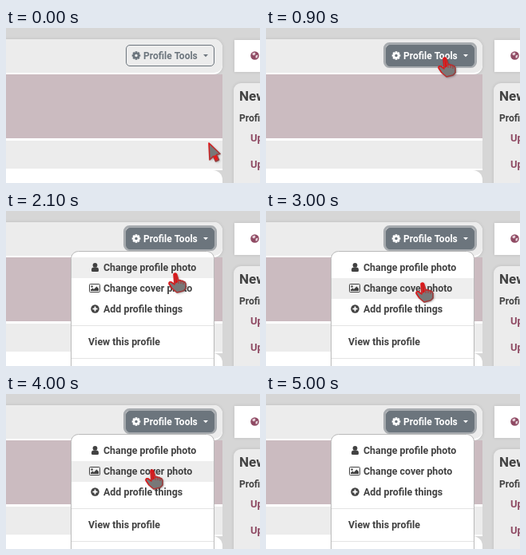
An HTML page with a canvas for the animation above (5.2 s loop, 318 px wide and 194 px high).

```html
<!DOCTYPE html>
<html lang="en">
<head>
<meta charset="utf-8">
<title>Profile tools</title>
<style>
html, body { margin: 0; width: 100%; height: 100%; overflow: hidden; background: #d6d6d6; }
canvas { display: block; width: 318px; height: 194px; }
</style>
</head>
<body>
<canvas id="stage"></canvas>
<script>
const W = 318, H = 194, LOOP = 5200;
const canvas = document.getElementById('stage');
const ctx = canvas.getContext('2d');
const ratio = window.devicePixelRatio || 1;
canvas.width = W * ratio;
canvas.height = H * ratio;

const INK = '#424242', PANEL = '#ececec', WINE = '#8f4a63', GREY = '#6c757d', DARK = '#4a1128';

// The pointer jumps between these places: time, x, y, shape.
const STEPS = [
  [0, 254, 144, 'arrow'], [200, 254, 142, 'arrow'], [400, 251, 122, 'arrow'],
  [500, 244, 88, 'arrow'], [600, 233, 52, 'arrow'], [700, 226, 37, 'hand'],
  [900, 224, 37, 'hand'], [1100, 222, 37, 'hand'], [1500, 207, 46, 'arrow'],
  [1600, 206, 50, 'arrow'], [1700, 207, 55, 'arrow'], [1800, 210, 64, 'hand'],
  [1900, 213, 74, 'hand'], [2000, 214, 79, 'hand'], [2100, 212, 78, 'hand'],
  [2200, 168, 79, 'hand'], [2300, 128, 79, 'hand'], [2600, 170, 82, 'hand'],
  [2700, 211, 88, 'hand'], [3000, 196, 90, 'hand'], [3100, 154, 96, 'hand'],
  [3300, 132, 96, 'hand'], [3400, 110, 96, 'hand'], [3600, 128, 96, 'hand'],
  [3700, 154, 96, 'hand'], [3800, 182, 96, 'hand'], [3900, 201, 96, 'hand'],
  [4000, 183, 95, 'hand'], [4100, 166, 96, 'hand'], [4200, 150, 98, 'hand'],
  [4300, 132, 98, 'hand'], [4400, 114, 97, 'hand'], [4500, 97, 95, 'hand'],
  [4600, 83, 95, 'arrow'], [4800, 76, 50, 'arrow'], [4900, 171, 3, 'arrow'],
  [5000, 0, 0, 'none']
];

function box(x, y, w, h, r, fill, stroke, line = 1) {
  ctx.beginPath();
  ctx.roundRect(x, y, w, h, r);
  if (fill) { ctx.fillStyle = fill; ctx.fill(); }
  if (stroke) { ctx.strokeStyle = stroke; ctx.lineWidth = line; ctx.stroke(); }
}

function disc(x, y, r, fill) {
  ctx.beginPath();
  ctx.arc(x, y, r, 0, Math.PI * 2);
  ctx.fillStyle = fill;
  ctx.fill();
}

function poly(points, fill) {
  ctx.beginPath();
  points.forEach(([x, y]) => ctx.lineTo(x, y));
  ctx.closePath();
  ctx.fillStyle = fill;
  ctx.fill();
}

function text(string, x, y, size, color) {
  ctx.font = `bold ${size}px Roboto, sans-serif`;
  ctx.fillStyle = color;
  ctx.fillText(string, x, y);
}

function shadowed(blur, color, draw) {
  ctx.save();
  ctx.shadowBlur = blur * ratio;
  ctx.shadowColor = color;
  draw();
  ctx.restore();
}

function drawPage() {
  ctx.fillStyle = '#d6d6d6';
  ctx.fillRect(0, 0, W, H);

  shadowed(4, 'rgba(0,0,0,.12)', () => box(-20, 14, 291, 44, [0, 11, 11, 0], '#fff'));
  box(-20, 14, 291, 42, [0, 11, 10, 0], PANEL);
  ctx.fillStyle = '#cbbbc0';
  ctx.fillRect(0, 58, 271, 80);
  ctx.fillStyle = '#fff';
  ctx.fillRect(0, 138, 271, 40);
  ctx.fillStyle = PANEL;
  ctx.fillRect(0, 141, 271, 35);
  box(-20, 178, 291, 40, [0, 12, 0, 0], '#fff');

  shadowed(4, 'rgba(0,0,0,.12)', () => {
    box(286, 15, 50, 40, 0, '#fff');
    box(285, 69, 50, 140, [9, 0, 0, 0], PANEL);
  });
  drawGlobe(311.5, 34.5);
  text('New', 292, 91, 17, INK);
  text('Profile', 292, 116.5, 12, INK);
  text('Updates', 306, 142, 13, WINE);
  text('Updates', 306, 175, 13, WINE);
}

function drawGlobe(x, y) {
  disc(x, y, 5.3, WINE);
  poly([[x - 3, y - 3], [x, y - 4], [x + 1, y - 2], [x - 1, y], [x - 3, y - 1]], '#e5d3da');
  poly([[x + 1, y], [x + 4, y - 1], [x + 3, y + 3], [x + 1, y + 3]], '#e5d3da');
}

function drawGear(x, y, color, hole) {
  ctx.save();
  ctx.translate(x, y);
  ctx.fillStyle = color;
  for (let i = 0; i < 4; i++) {
    ctx.fillRect(-1.3, -5.3, 2.6, 10.6);
    ctx.rotate(Math.PI / 4);
  }
  ctx.restore();
  disc(x, y, 4, color);
  disc(x, y, 1.7, hole);
}

function drawButton(state) {
  const idle = state === 'idle';
  const fill = { idle: PANEL, hover: DARK, open: GREY }[state];
  const ink = idle ? GREY : '#fff';
  if (state === 'open') box(148.5, 19.5, 114, 29, 6, null, '#a7abaf', 3);
  box(150.5, 21.5, 110, 26, 4.5, fill, idle ? GREY : fill);
  drawGear(163, 34.5, ink, fill);
  text('Profile Tools', 172, 39, 12, ink);
  poly([[247, 33], [253, 33], [250, 36.2]], ink);
}

function drawPerson() {
  disc(111.5, 67.8, 2.9, INK);
  box(107, 70.5, 9, 5.5, [3, 3, 1.5, 1.5], INK);
}

function drawPicture() {
  box(104.5, 91.5, 13, 10, 1, null, INK);
  disc(107.6, 94.5, 1.2, INK);
  poly([[106, 100], [106, 98.6], [108.5, 96.5], [110, 98], [113.4, 94.6], [116, 97], [116, 100]], INK);
}

function drawPlus() {
  disc(111.5, 122.5, 5.2, INK);
  ctx.fillStyle = '#fff';
  ctx.fillRect(108.5, 121.6, 6, 1.8);
  ctx.fillRect(110.6, 119.5, 1.8, 6);
}

function drawMenu(row) {
  box(81.5, 50.5, 179, 180, 9, '#fff', '#b9b9b9');
  if (row >= 0) {
    ctx.fillStyle = '#eeeeee';
    ctx.fillRect(82, 58 + row * 26, 178, 26);
  }
  drawPerson();
  drawPicture();
  drawPlus();
  ['Change profile photo', 'Change cover photo', 'Add profile things']
    .forEach((label, i) => text(label, 122, 75 + i * 26, 12.4, INK));
  text('View this profile', 103, 168, 12.4, INK);
  ctx.fillStyle = '#e4e4e4';
  ctx.fillRect(82, 143, 178, 1);
  ctx.fillRect(82, 184, 178, 1);
}

const ARROW = new Path2D('M0 0L14 13.5L9.5 14.5L12.5 21L8.5 23L5.5 16.5L1 21Z');
const HAND = new Path2D('M-2 1Q0-1 1.5 1L4 9Q6 8 7 9.5Q9 9 10 10.5Q12 10 13 13L13 19L10 22L2 24L-4 19L-8 13Q-8 10-5 11L-1 14Z');

// The outline fades from bright red at the upper left to a dull red.
function outlineColor() {
  const fade = ctx.createLinearGradient(-4, 8, 12, 18);
  fade.addColorStop(0, '#e01215');
  fade.addColorStop(0.45, '#c42a2a');
  fade.addColorStop(1, '#963c3c');
  return fade;
}

function drawPointer(x, y, shape) {
  if (shape === 'none') return;
  const hand = shape === 'hand';
  const path = hand ? HAND : ARROW;
  ctx.save();
  ctx.translate(x, y);
  ctx.lineJoin = 'round';
  shadowed(3, 'rgba(0,0,0,.5)', () => {
    ctx.shadowOffsetX = ctx.shadowOffsetY = ratio;
    ctx.fillStyle = '#787878';
    ctx.fill(path);
  });
  ctx.strokeStyle = outlineColor();
  ctx.lineWidth = 1.6;
  ctx.stroke(path);
  if (hand) {
    poly([[-1, 1], [1, 1], [3, 11], [0, 13]], '#dc1416');
    ctx.lineWidth = 1;
    ctx.stroke(new Path2D('M4 9V13M7 10V13M10 11V14'));
  } else {
    poly([[6, 16], [9, 15], [11.5, 20.5], [8.7, 22]], '#f01515');
  }
  ctx.restore();
}

function hoveredRow(t) {
  if (t < 1800 || t >= 4600) return -1;
  return t < 2700 ? 0 : 1;
}

function render(t) {
  ctx.setTransform(ratio, 0, 0, ratio, 0, 0);
  drawPage();
  drawButton(t < 700 ? 'idle' : t < 900 ? 'hover' : 'open');
  if (t >= 1000) drawMenu(hoveredRow(t));
  const [, x, y, shape] = STEPS.findLast(step => step[0] <= t);
  drawPointer(x, y, shape);
}

const start = performance.now();
function tick() {
  render((performance.now() - start) % LOOP);
  requestAnimationFrame(tick);
}
tick();
</script>
</body>
</html>
```
